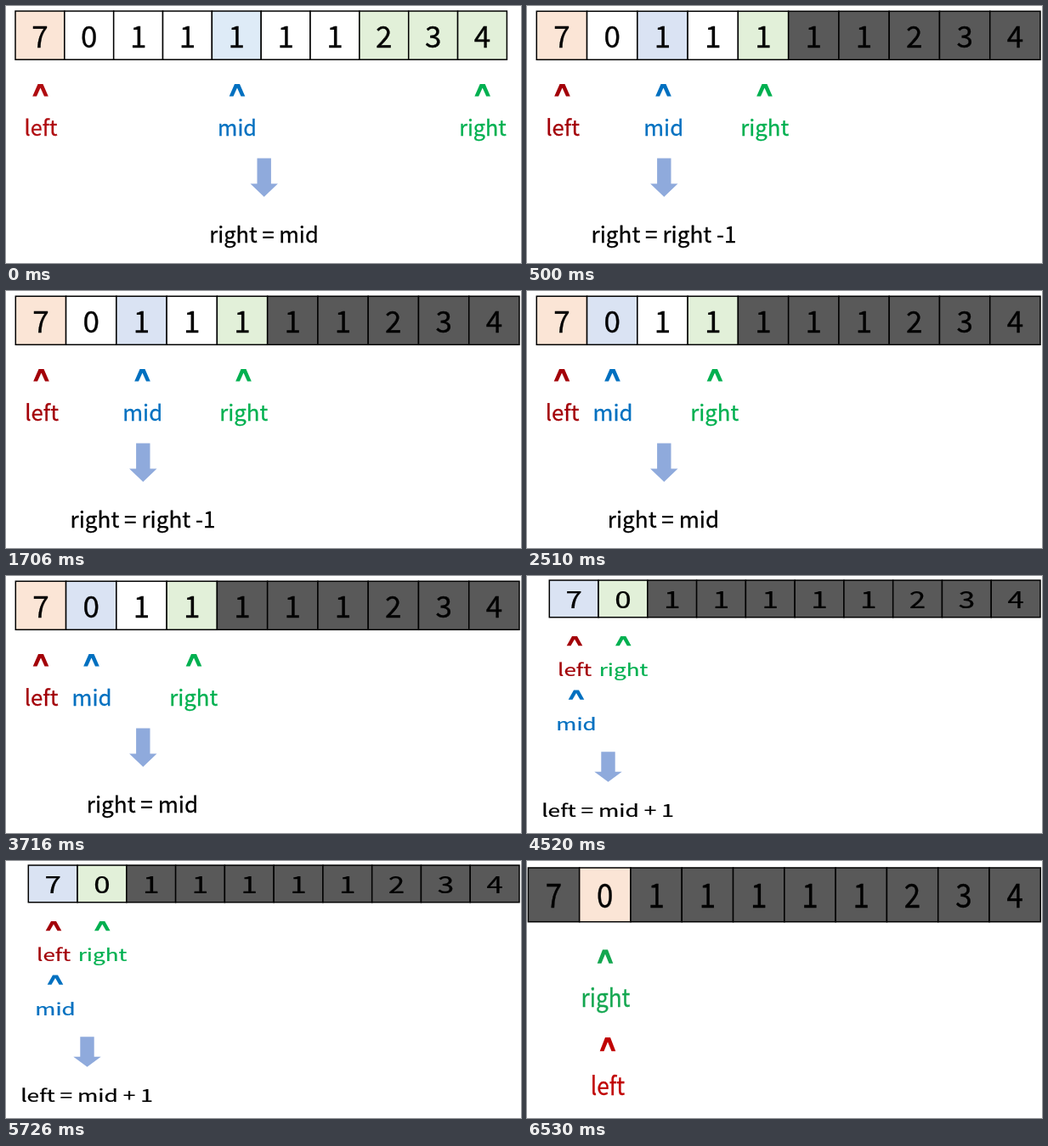
Recreate the animation shown at these times as an HTML page. Size 606 by 303 pixels, loop 8000 ms.

```html
<!DOCTYPE html>
<html lang="en">
<head>
<meta charset="utf-8">
<title>Binary search in a rotated array</title>
<style>
  html, body { margin: 0; width: 100%; height: 100%; overflow: hidden; background: #fff; }
  svg { display: block; width: 100%; height: 100%; }
  text { font-family: "Noto Sans CJK SC", "Noto Sans CJK JP", Lato, sans-serif; text-anchor: middle; stroke-width: 0.3; }
  .scene { opacity: 0; }
</style>
</head>
<body>
<svg id="stage" viewBox="0 0 606 303"></svg>
<script>
const LOOP = 8000;
const DIGITS = [7, 0, 1, 1, 1, 1, 1, 2, 3, 4];
const FILL = { o: '#fbe5d6', s: '#deebf7', b: '#dae3f3', g: '#e2f0d9', d: '#595959', w: '#ffffff' };
const RED = '#c00000', MAROON = '#a30008', BLUE = '#0070c0', GREEN = '#00b050';

// cells: one fill key per digit; scale: how far the slide is squeezed;
// pointers: [word, colour, caret x, caret top, label x, label baseline]
const SCENES = [
  { end: 500, cells: 'owwwswwggg', box: [11, 589.4, 6, 63.2], base: 49, size: 25.2, scale: [1, 1],
    pointers: [['left', '#b00c10', 40.5, 92, 41, 152.6], ['mid', BLUE, 272, 92, 272, 152.6], ['right', GREEN, 560.7, 92, 561, 152.6]],
    arrow: [303.7, 179.5], note: ['right = mid', 303.5, 279.3] },
  { end: 2510, cells: 'owbwgddddd', box: [11.3, 604, 6.2, 63.3], base: 49, size: 25.8, scale: [1, 1],
    pointers: [['left', MAROON, 41.5, 92, 42, 152.6], ['mid', BLUE, 160.5, 92, 160.7, 152.6], ['right', GREEN, 279.5, 92, 279.7, 152.6]],
    arrow: [161.3, 179.5], note: ['right = right -1', 161, 279.3] },
  { end: 4520, cells: 'obwgdddddd', box: [11.3, 604, 6.2, 63.3], base: 49, size: 25.8, scale: [1, 1],
    pointers: [['left', MAROON, 41, 92, 41.5, 152.6], ['mid', BLUE, 100.5, 92, 101, 152.6], ['right', GREEN, 221, 92, 220.7, 152.6]],
    arrow: [161.3, 179.5], note: ['right = mid', 160.5, 279.3] },
  { end: 6530, cells: 'bgdddddddd', box: [26.3, 604, 5, 48.7], base: 38, size: 26, scale: [1, 0.78],
    pointers: [['left', MAROON, 56, 71, 56, 118], ['right', GREEN, 113.3, 71, 113.5, 118], ['mid', BLUE, 58, 134.5, 58, 181.5]],
    arrow: [95.5, 207.3], note: ['left = mid + 1', 95, 284] },
  { end: 8000, cells: 'dodddddddd', box: [1.4, 604.3, 8, 71.7], base: 55, size: 26.2, scale: [1, 1.12],
    pointers: [['right', '#14a750', 92, 104.5, 92.5, 172], ['left', RED, 95, 208, 95, 276]] }
];

const stage = document.getElementById('stage');

function add(parent, tag, attrs, words) {
  const node = document.createElementNS('http://www.w3.org/2000/svg', tag);
  for (const key in attrs) node.setAttribute(key, attrs[key]);
  if (words !== undefined) node.textContent = words;
  parent.appendChild(node);
  return node;
}

const place = (x, y, [sx, sy]) => `translate(${x} ${y}) scale(${sx} ${sy})`;

function label(parent, words, x, y, size, scale, color = '#000') {
  add(parent, 'text', { transform: place(x, y, scale), 'font-size': size, fill: color, stroke: color }, words);
}

function drawCells(group, { cells, box: [x0, x1, y0, y1], base, scale }) {
  const w = (x1 - x0) / DIGITS.length;
  DIGITS.forEach((digit, i) => {
    const x = x0 + i * w;
    add(group, 'rect', { x, y: y0, width: w, height: y1 - y0, fill: FILL[cells[i]], stroke: '#000', 'stroke-width': 1.5 });
    label(group, digit, x + w / 2, base, 35, scale);
  });
}

function build(scene, start) {
  const { scale, size, pointers, arrow, note, end } = scene;
  const group = add(stage, 'g', { class: 'scene' });
  drawCells(group, scene);
  for (const [word, color, cx, cy, tx, ty] of pointers) {
    add(group, 'path', { d: 'M-9.3 14.5L-3 0H3L9.3 14.5H4.5L0 4.6L-4.5 14.5Z', transform: place(cx, cy, scale), fill: color });
    label(group, word, tx, ty, size, scale, color);
  }
  if (arrow) {
    add(group, 'path', { d: 'M-8.2 0H8.2V30H16.2L0 45.5L-16.2 30H-8.2Z', transform: place(...arrow, scale), fill: '#8faadc' });
  }
  if (note) label(group, ...note, size * 1.012, scale);

  const a = start / LOOP, b = end / LOOP;
  const steps = [[0, 0], [a, 0], [a, 1], [b, 1], [b, 0], [1, 0]]
    .filter(([offset, on]) => (a > 0 || offset > 0 || on) && (b < 1 || offset < 1 || on));
  group.animate(steps.map(([offset, opacity]) => ({ offset, opacity })), { duration: LOOP, iterations: Infinity });
}

SCENES.forEach((scene, i) => build(scene, i ? SCENES[i - 1].end : 0));
</script>
</body>
</html>
```
